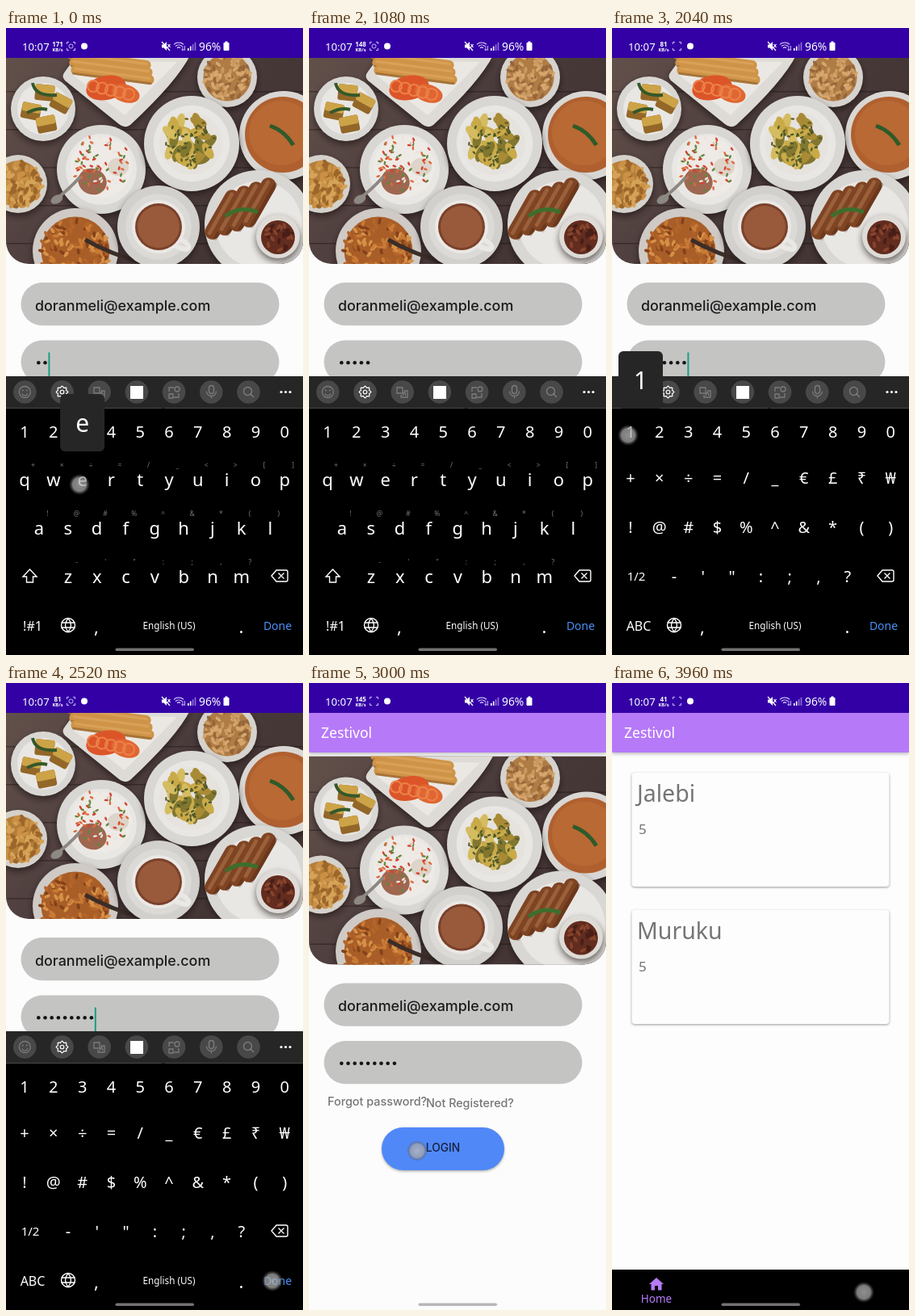
Recreate the animation shown at these times as an HTML page with a canvas. Size 368x776 px, loop 4.08 s.

```html
<!DOCTYPE html>
<html lang="en">
<head>
<meta charset="utf-8">
<title>Login demo</title>
<style>
html, body { margin: 0; width: 368px; height: 776px; overflow: hidden; background: #fcfcfc; }
canvas { display: block; }
</style>
</head>
<body>
<canvas id="stage" width="368" height="776"></canvas>
<script>
const W = 368, H = 776, STEP = 120, STEPS = 34;
const ctx = document.getElementById('stage').getContext('2d');
const UI = '"Noto Sans", sans-serif', GEO = 'Inter, sans-serif';
const DARK = '#3300a6', LILAC = '#b67af8', PAGE = '#fcfcfc';
const PAN = 56.5, KEY_GAP = 35.8;

function rect(x, y, w, h, color, r = 0) {
  ctx.fillStyle = color;
  ctx.beginPath();
  ctx.roundRect(x, y, w, h, r);
  ctx.fill();
}
function oval(x, y, rx, ry, color, turn = 0) {
  ctx.fillStyle = color;
  ctx.beginPath();
  ctx.ellipse(x, y, rx, ry, turn, 0, Math.PI * 2);
  ctx.fill();
}
const disc = (x, y, r, color) => oval(x, y, r, r, color);
function ring(x, y, r, color, width = 1, from = 0, to = Math.PI * 2) {
  ctx.strokeStyle = color;
  ctx.lineWidth = width;
  ctx.beginPath();
  ctx.arc(x, y, r, from, to);
  ctx.stroke();
}
function path(d, color, width = 0) {
  const p = new Path2D(d);
  if (width) {
    ctx.strokeStyle = color;
    ctx.lineWidth = width;
    ctx.stroke(p);
  } else {
    ctx.fillStyle = color;
    ctx.fill(p);
  }
}
function text(s, x, y, size, color = '#fff', font = UI, align = 'left', weight = 400) {
  ctx.font = `${weight} ${size}px ${font}`;
  ctx.textAlign = align;
  ctx.fillStyle = color;
  ctx.fillText(s, x, y);
}
function group(dx, dy, alpha, draw) {
  ctx.save();
  ctx.translate(dx, dy);
  ctx.globalAlpha *= alpha;
  draw();
  ctx.restore();
}
function shadowed(blur, dy, color, draw) {
  ctx.save();
  ctx.shadowBlur = blur;
  ctx.shadowOffsetY = dy;
  ctx.shadowColor = color;
  draw();
  ctx.restore();
}
function seeded(seed) {
  return () => (seed = (seed * 16807) % 2147483647) / 2147483647;
}
function scatter(x, y, r, count, colors, size, seed) {
  const rnd = seeded(seed);
  for (let i = 0; i < count; i++) {
    const a = rnd() * Math.PI * 2, d = Math.sqrt(rnd()) * r;
    oval(x + Math.cos(a) * d, y + Math.sin(a) * d, size, size * 0.5, colors[i % colors.length], rnd() * 3);
  }
}

// Table of dishes, simplified to flat shapes.
function plate(x, y, r, rim = '#d9d7d4', well = '#e9e7e4') {
  shadowed(8, 4, 'rgba(20,14,12,.6)', () => disc(x, y, r, rim));
  disc(x, y, r * 0.8, well);
}
function rolls(x, y, count, dx, dy, len, thick, turn, color) {
  for (let i = 0; i < count; i++) {
    group(x + dx * i, y + dy * i, 1, () => {
      ctx.rotate(turn);
      rect(-len / 2, -thick / 2, len, thick, color, thick / 2);
      rect(-len / 2 + 4, -thick / 4, len - 8, thick / 4, 'rgba(255,210,150,.2)', 2);
      rect(-len / 2 + 2, thick / 4, len - 4, thick / 4, 'rgba(50,20,10,.25)', 2);
    });
  }
}
function photo() {
  ctx.save();
  ctx.beginPath();
  ctx.roundRect(0, 34, W, 258, [0, 0, 28, 28]);
  ctx.clip();
  const wood = ctx.createLinearGradient(0, 34, W, 292);
  wood.addColorStop(0, '#62504a');
  wood.addColorStop(0.5, '#48393a');
  wood.addColorStop(1, '#40322f');
  rect(0, 34, W, 258, wood);
  for (let y = 78; y < 292; y += 47) rect(0, y, W, 1.5, 'rgba(20,14,12,.4)');

  shadowed(8, 4, 'rgba(20,14,12,.6)', () =>
    path('M98 20 L228 34 Q212 66 154 120 Q147 125 140 119 L73 65 Q68 60 73 54Z', '#dedbd7'));
  path('M100 40 L212 42 L147 108 L84 59Z', '#ebe8e4');
  rolls(128, 40, 3, 2, 9, 104, 12, 0.13, '#cf9448');
  oval(124, 74, 25, 15, '#dc5529', -0.2);
  oval(148, 81, 18, 11, '#e06632', 0.3);
  for (let i = 0; i < 5; i++) ring(108 + i * 11, 72 + i * 2.5, 7, '#ec8148', 2);

  plate(46, 100, 40);
  [[48, 80, 0.1], [68, 93, 0.5], [31, 103, 0.2], [50, 119, -0.2]].forEach(([x, y, turn]) =>
    group(x, y, 1, () => {
      ctx.rotate(turn);
      rect(-12, -10, 24, 20, '#936728', 3);
      rect(-12, -10, 24, 11, '#cda347', 3);
    }));
  path('M33 68 Q36 85 63 83 M26 105 Q40 98 51 101', '#34582a', 4);

  plate(274, 61, 37, '#d6d2cd', '#b07c45');
  scatter(274, 61, 28, 90, ['#c99a60', '#96663a', '#d5a66d'], 4, 11);

  plate(344, 133, 55);
  disc(343, 132, 47, '#b0602f');
  disc(341, 130, 40, '#b96933');
  path('M327 121 Q345 127 356 145', '#2f5a2a', 5);

  plate(118, 175, 55);
  disc(118, 172, 38, '#eeeae6');
  oval(107, 190, 18, 16, '#9d6750', 0.4);
  oval(139, 172, 13, 11, '#ddd4ca');
  scatter(118, 168, 36, 80, ['#d1432f', '#dd6a3b', '#64863f', '#ece4dc'], 2.6, 23);
  path('M59 214 Q78 200 92 184', '#8d8781', 4);
  oval(63, 212, 8, 5, '#8e8882', -0.5);

  plate(230, 143, 59);
  disc(229, 143, 39, '#e6e3de');
  scatter(229, 141, 29, 34, ['#82772f', '#c9aa48', '#a98b35', '#d5bc60'], 11, 5);
  scatter(229, 141, 31, 45, ['#4a5a28', '#615d2a'], 2.5, 31);

  plate(15, 193, 36, '#d5d1cb', '#b57f3a');
  scatter(15, 193, 29, 80, ['#d5a358', '#9c662b', '#ca9146'], 5, 47);

  plate(86, 276, 53, '#cfcac5', '#a95e28');
  scatter(86, 277, 43, 130, ['#c97b36', '#844219', '#d69148', '#b3652a'], 4, 71);
  path('M98 262 Q130 280 170 291', '#3b2d28', 5);

  plate(189, 246, 51, '#d2d0cd', '#dcdad7');
  path('M214 260 Q232 270 224 274 Q218 274 206 268', '#eae8e5', 6);
  disc(189, 246, 33, '#ebe8e5');
  disc(189, 246, 29, '#7a412a');
  disc(189, 246, 26, '#995a3b');

  plate(313, 243, 67);
  rolls(268, 231, 4, 15, -5, 68, 19, -1.05, '#7f4423');
  path('M272 233 Q290 219 312 228', '#3d6e2e', 5);
  plate(337, 258, 27, '#dedbd7', '#e6e2dd');
  disc(337, 259, 21, '#622c1f');
  scatter(337, 259, 17, 25, ['#86432b', '#481e17'], 4, 13);
  ctx.restore();
}

function appBar() {
  shadowed(4, 2, 'rgba(0,0,0,.25)', () => rect(0, 37, W, 49, LILAC));
  rect(0, 0, W, 37, DARK);
  text('Zestivol', 15, 68, 17.5);
}

function loginPage(dots, cursor) {
  rect(0, 0, W, H, PAGE);
  appBar();
  group(0, PAN, 1, photo);
  rect(18.5, 371.5, 320, 53.3, '#c4c5c3', 27);
  rect(18.5, 443, 320, 53.3, '#c4c5c3', 27);
  text('doranmeli@example.com', 36, 406, 17.9, '#1b1b1b', GEO, 'left', 500);
  for (let i = 0; i < dots; i++) disc(40.3 + i * 8.2, 470.7, 2.3, '#151515');
  if (cursor) rect(36 + dots * 8.2, 458, 2, 30, '#1c9c82');
  text('Forgot password?', 23, 523, 14.4, '#757575', GEO, 'left', 500);
  text('Not Registered?', 145, 524.5, 14.3, '#757575', GEO, 'left', 500);
  shadowed(3, 1.5, 'rgba(0,0,0,.3)', () => rect(90, 550, 152, 53, '#5088f8', 26.5));
  text('LOGIN', 166, 580, 13.8, '#16213c', GEO, 'center', 500);
}

function homePage() {
  rect(0, 0, W, H, '#fdfdfd');
  appBar();
  [['Jalebi', 111], ['Muruku', 281]].forEach(([name, y]) => {
    shadowed(3, 1, 'rgba(0,0,0,.4)', () => rect(24.5, y, 319, 141, '#fdfdfd', 4));
    text(name, 31, y + 36, 28.5, '#757575');
    text('5', 33, y + 76, 17, '#757575');
  });
  rect(0, 726, W, 50, '#000');
  path('M46 744 L55 736 L64 744 H61.5 V751.5 H57 V746 H53 V751.5 H48.5 V744Z', LILAC);
  text('Home', 55, 767, 13.5, LILAC, UI, 'center');
}

function statusIcons(frame) {
  const speed = frame < 2 ? 171 : frame < 12 ? 148 : frame < 23 ? 81 : frame < 33 ? 145 : 41;
  text('10:07', 20, 28, 13.2);
  text(speed, 64, 22.5, 8, '#fff', UI, 'center', 700);
  text('KB/s', 64, 29, 5.8, '#fff', UI, 'center', 700);
  path('M75.5 20 V17.5 H78 M83 17.5 H85.5 V20 M85.5 25 V27.5 H83 M78 27.5 H75.5 V25', '#cdbdf0', 1);
  if (frame % 7 < 3) ring(80.5, 22.5, 2.5, '#cdbdf0', 1);
  disc(97, 22.5, 4, '#fff');

  path('M193 20.5 H195.5 L199 17 V28 L195.5 24.5 H193Z', '#fff');
  path('M193 17 L203 28 M200.5 20 L203.5 24 M203.5 20 L200.5 24', '#fff', 1.2);
  [3, 6, 9].forEach(r => ring(214, 27, r, '#e6dcff', 1.1, -2.3, -0.85));
  path('M219 22 V28 M217.5 26 L219 28 L220.5 26 M221.5 28 V22', '#e6dcff', 0.8);
  for (let i = 0; i < 4; i++) rect(225 + i * 2.9, 25 - i * 2.4, 1.6, 3 + i * 2.4, i < 2 ? '#fff' : '#8f72d6');
  text('96%', 239, 28, 13.8);
  rect(269.5, 18, 7, 10, '#fff', 1);
  rect(271.5, 16.5, 3, 2, '#fff');
}

// Keyboard.
const LETTERS = [
  [23, 500, '1234567890'],
  [23, 560, 'qwertyuiop', '+×÷=/_<>[]'],
  [41, 620, 'asdfghjkl', '!@#%^&*()'],
  [77, 680, 'zxcvbnm', '-\'":;,?'],
];
const SYMBOLS = [
  [23, 500, '1234567890'],
  [23, 557, '+×÷=/_€£₹₩'],
  [23, 618, '!@#$%^&*()'],
  [77, 679, '-\'":;,?'],
];
const POPUP_TOP = [400, 453, 513, 573];

function findKey(rows, label) {
  for (let row = 0; row < rows.length; row++) {
    const [x, , keys] = rows[row], col = keys.indexOf(label);
    if (col >= 0) return { x: x + col * KEY_GAP, top: POPUP_TOP[row] };
  }
}

function toolbarIcons() {
  const dim = 'rgba(255,255,255,.28)';
  for (let i = 0; i < 7; i++) disc(23.3 + i * 46.2, 450.5, 14.3, 'rgba(255,255,255,.16)');
  ring(23.3, 450.5, 7, dim, 1.3);
  ring(23.3, 451.5, 3.5, dim, 1.2, 0.2, 2.9);
  disc(20.8, 448.5, 1, dim);
  disc(25.8, 448.5, 1, dim);
  ring(69.5, 450.5, 2.3, '#fff', 1.1);
  ctx.strokeStyle = '#fff';
  ctx.lineWidth = 1.2;
  ctx.beginPath();
  for (let i = 0; i < 48; i++) {
    const a = i / 48 * Math.PI * 2, r = 6.4 + Math.cos(a * 8) * 0.9;
    ctx.lineTo(69.5 + Math.sin(a) * r, 450.5 + Math.cos(a) * r);
  }
  ctx.closePath();
  ctx.stroke();
  path('M109 445 H116 V452 H109Z M114 454 V457 H122 V449 H118 M116 455 L118.5 450 L120 455', dim, 1.3);
  rect(154, 443, 16, 16, '#fff');
  path('M202 450 V445 H208 M214 452 V457 H208 M202 453 H207 V458 H202Z', dim, 1.3);
  ring(212, 447, 3, dim, 1.3);
  ctx.strokeStyle = dim;
  ctx.lineWidth = 1.4;
  ctx.beginPath();
  ctx.roundRect(251.5, 442.5, 6, 10, 3);
  ctx.stroke();
  path('M248.5 449.5 Q249 455.5 254.5 455.5 Q260 455.5 260.5 449.5 M254.5 455.5 V458.5', dim, 1.3);
  ring(299.5, 449.5, 5, dim, 1.4);
  path('M303 453 L307 457', dim, 1.4);
  [341, 346.5, 352].forEach(x => disc(x, 450.5, 1.6, '#fff'));
}

function keys(symbols) {
  (symbols ? SYMBOLS : LETTERS).forEach(([x, y, labels, hints], row) => {
    const letter = !symbols && row > 0;
    [...labels].forEach((label, i) => {
      const kx = x + i * KEY_GAP;
      text(label, kx, y + 7, letter ? 22 : 20, '#fff', UI, 'center');
      if (hints) text(hints[i], kx + 10.5, y - 16, 8.5, '#777', UI, 'center');
    });
  });
  if (symbols) text('1/2', 30, 684, 15, '#fff', UI, 'center');
  else path('M29.5 670 L38 679 H33.5 V686 H25.5 V679 H21Z', '#fff', 1.4);
  path('M335 671 H347 Q349 671 349 673 V683 Q349 685 347 685 H335 L329 678Z M337.5 674.5 L344.5 681.5 M344.5 674.5 L337.5 681.5', '#fff', 1.4);
  text(symbols ? 'ABC' : '!#1', 33, 745.5, 16, '#fff', UI, 'center');
  ring(77, 739, 8.5, '#fff', 1.4);
  path('M68.5 736 H85.5 M68.5 742 H85.5 M77 730.5 Q70 739 77 747.5 Q84 739 77 730.5', '#fff', 1.3);
  text(',', 112, 749, 22, '#fff', UI, 'center');
  text('English (US)', 202, 744, 11.7, '#fff', UI, 'center');
  text('.', 291.5, 749, 22, '#fff', UI, 'center');
  text('Done', 336.5, 745, 14, '#4a90f5', UI, 'center');
}

// The panel fades while it drops; its toolbar icons stay at full strength.
function keyboardPanel(drop, alpha) {
  group(0, drop, alpha, () => {
    rect(0, 431, W, 39.5, '#262626');
    rect(0, 470.5, W, H - 470.5, '#000');
  });
  group(0, drop, 1, toolbarIcons);
}

function popup(rows, label) {
  const { x, top } = findKey(rows, label);
  const left = Math.max(8, x - 27.5);
  rect(left, top, 55, 71, '#262626', 6);
  text(label, left + 27.5, top + 47, 30, '#fff', UI, 'center');
}

function touch(x, y) {
  const glow = ctx.createRadialGradient(x, y, 0, x, y, 13);
  glow.addColorStop(0, 'rgba(190,190,190,.75)');
  glow.addColorStop(0.65, 'rgba(165,165,165,.75)');
  glow.addColorStop(0.8, 'rgba(110,110,110,.5)');
  glow.addColorStop(1, 'rgba(90,90,90,0)');
  disc(x, y, 13, glow);
}

const PRESSES = {  // step: [touch x, touch y, pressed key]
  0: [91, 565, 'e'], 1: [186, 683, 'v'], 3: [280, 563, 'i'], 5: [258, 683, 'n'],
  12: [30, 744], 15: [57, 622, '@'], 17: [20, 504, '1'], 18: [58, 504, '2'], 19: [95, 504, '3'],
  21: [330, 740], 25: [134, 579], 26: [134, 579], 32: [312, 754], 33: [312, 754],
};
const TYPED = [0, 2, 4, 6, 16, 17, 19, 20];  // steps at which a dot is added
const SYMBOLS_AT = 13, HIDE_AT = 22, SWAP_AT = 27;
const SWAP = { 27: [-14, 60.5, 0.93], 28: [-22, 14, 1], 29: [-24, 3, 1] };

function render(frame) {
  const done = TYPED.filter(step => step <= frame);
  const dots = 1 + done.length;
  const blinkFrom = frame < HIDE_AT ? done[done.length - 1] : HIDE_AT;
  const cursor = frame < SWAP_AT && (frame - blinkFrom) % 3.5 < 1.75;
  const symbols = frame >= SYMBOLS_AT, typing = frame < HIDE_AT;
  const [oldY, newY, alpha] = SWAP[frame] || [0, 0, 1];
  const press = PRESSES[frame];

  if (frame <= SWAP_AT) group(0, typing ? -PAN : oldY, 1, () => loginPage(dots, cursor));
  else rect(0, 0, W, H, DARK);
  if (typing) rect(0, 0, W, 37, DARK);
  if (frame >= SWAP_AT) group(0, newY, alpha, homePage);
  if (frame === SWAP_AT) {
    rect(0, H + oldY, W, -oldY, '#ececec');
    ring(134, 579, 10, '#e6eaee', 1.2);
  }

  if (typing) {
    keyboardPanel(0, 1);
    keys(symbols);
  } else if (frame === HIDE_AT) {
    keyboardPanel(181, 0.175);
    ring(330, 559, 10, '#ededed', 1.2);
  }
  statusIcons(frame);
  const pill = frame === HIDE_AT ? '#e6e6e6' : !typing && frame <= SWAP_AT ? '#b8b8b8' : '#727272';
  rect(135.5, 767.5, 97.5, 3.5, pill, 1.75);

  if (press) {
    const [x, y, label] = press;
    if (label) popup(symbols ? SYMBOLS : LETTERS, label);
    touch(x, y);
  }
}

let shown = -1;
function tick() {
  const frame = Math.floor(performance.now() / STEP) % STEPS;
  if (frame !== shown) render(shown = frame);
  requestAnimationFrame(tick);
}
tick();
</script>
</body>
</html>
```
